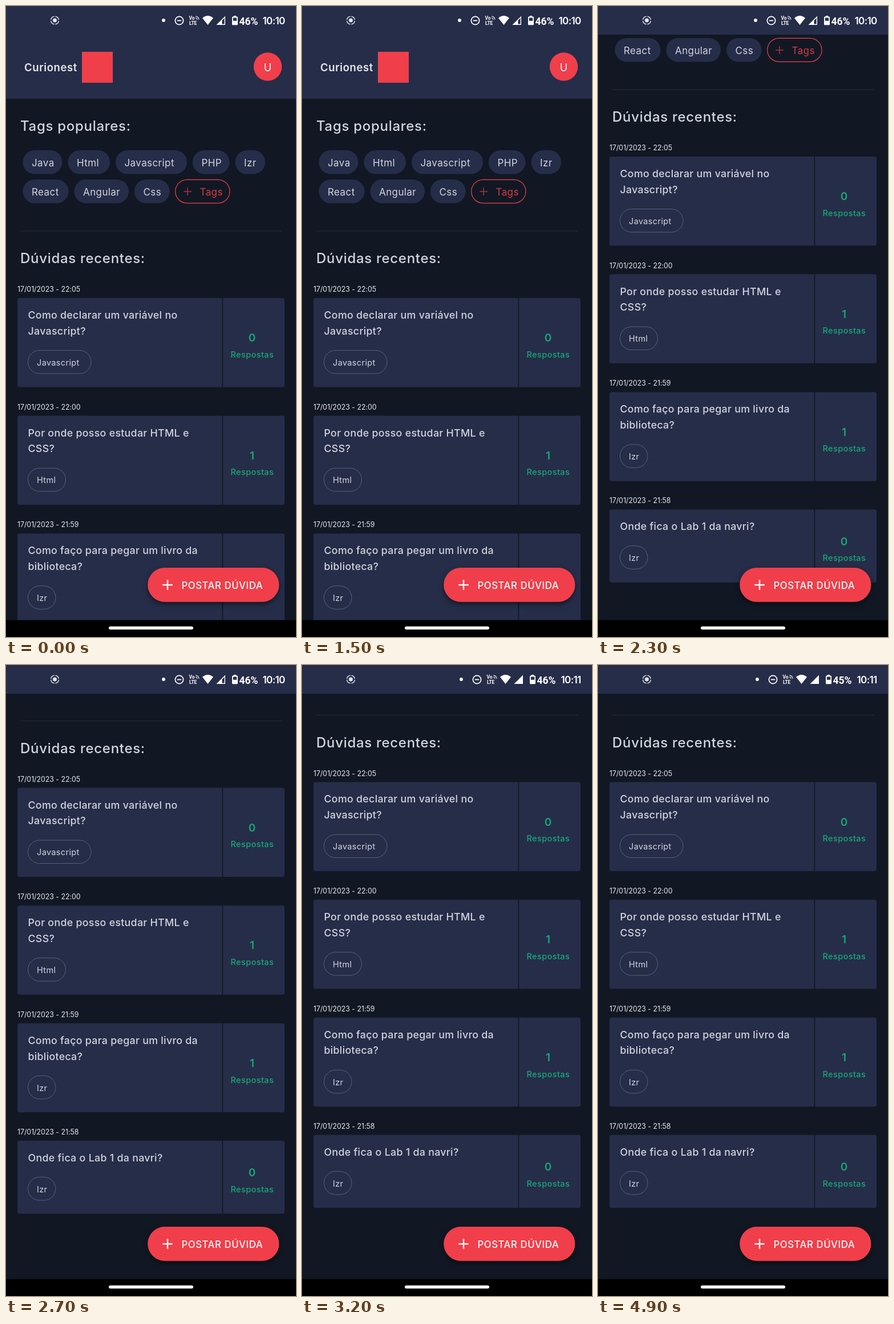
Recreate the animation shown at these times as an HTML page with a canvas. Size 508x1102 px, loop 5000 ms.

```html
<!DOCTYPE html>
<html lang="pt">
<head>
<meta charset="utf-8">
<style>
  html, body { margin: 0; width: 100%; height: 100%; overflow: hidden; background: #111824; }
  canvas { display: block; width: 508px; height: 1102px; }
</style>
</head>
<body>
<canvas id="stage"></canvas>
<script>
const W = 508, H = 1102, LOOP = 5000, STEP = 100;
const BG = '#111824', PANEL = '#262d49', RED = '#f03f4a', GREEN = '#17a877', PALE = '#d2d5de', WHITE = '#fff';

const canvas = document.getElementById('stage');
const ctx = canvas.getContext('2d');
const ratio = window.devicePixelRatio || 1;
canvas.width = W * ratio;
canvas.height = H * ratio;

// size, weight, letter spacing, family
const styles = {
  heading: [24, 500, 0.7],
  brand: [18.5, 600, 0.6],
  tag: [17, 400, 0.4],
  title: [17.8, 500, 0.3],
  date: [12.4, 400, -0.05],
  small: [14.5, 400, 0.35],
  reply: [14.5, 500, 0.4],
  count: [19, 600, 0],
  button: [16.8, 500, 0.55],
  avatar: [18, 400, 0],
  clock: [17, 600, -0.65],
  percent: [17.5, 600, 0, 'Roboto'],
  tiny: [8.5, 700, -0.2, 'Roboto']
};

// Tag label, left edge, top edge, width
const tags = [
  ['Java', 29.5, 252, 69], ['Html', 108.5, 252, 73.5], ['Javascript', 192, 252, 125],
  ['PHP', 327, 252, 64.5], ['Izr', 401.5, 252, 52.5],
  ['React', 29.5, 303, 80], ['Angular', 119.5, 303, 95.5], ['Css', 225, 303, 61.5]
];

const cards = [
  { y: 510, date: '22:05', lines: ['Como declarar um variável no', 'Javascript?'], tag: 'Javascript', tagW: 110.5, replies: 0 },
  { y: 715.6, date: '22:00', lines: ['Por onde posso estudar HTML e', 'CSS?'], tag: 'Html', tagW: 66, replies: 1, pressed: true },
  { y: 921.3, date: '21:59', lines: ['Como faço para pegar um livro da', 'biblioteca?'], tag: 'Izr', tagW: 48.5, replies: 1 },
  { y: 1126.3, date: '21:58', lines: ['Onde fica o Lab 1 da navri?'], tag: 'Izr', tagW: 48.5, replies: 0 }
];

// y is the middle of the capitals
function text(str, x, y, style, color, align = 'left') {
  const [size, weight, spacing, family = 'Inter'] = styles[style];
  ctx.font = `${weight} ${size}px ${family}, sans-serif`;
  ctx.letterSpacing = spacing + 'px';
  ctx.textAlign = align;
  ctx.fillStyle = color;
  ctx.fillText(str, x, y + size * 0.364);
}

function rect(x, y, w, h, color) {
  ctx.fillStyle = color;
  ctx.fillRect(x, y, w, h);
}

function round(x, y, w, h, r, fill, stroke, line = 1) {
  ctx.beginPath();
  ctx.roundRect(x, y, w, h, r);
  paint(fill, stroke, line);
}

function disc(x, y, r, fill, stroke, line) {
  ctx.beginPath();
  ctx.arc(x, y, r, 0, Math.PI * 2);
  paint(fill, stroke, line);
}

function paint(fill, stroke, line) {
  if (fill) {
    ctx.fillStyle = fill;
    ctx.fill();
  }
  if (stroke) {
    ctx.strokeStyle = stroke;
    ctx.lineWidth = line;
    ctx.stroke();
  }
}

function plus(x, y, size, line, color) {
  rect(x - size / 2, y - line / 2, size, line, color);
  rect(x - line / 2, y - size / 2, line, size, color);
}

function polygon(points, fill) {
  ctx.beginPath();
  points.forEach(([x, y]) => ctx.lineTo(x, y));
  ctx.closePath();
  paint(fill);
}

function mix(t, keys) {
  for (let i = 1; i < keys.length; i++) {
    const [t0, v0] = keys[i - 1], [t1, v1] = keys[i];
    if (t <= t1) return v0 + (v1 - v0) * Math.max(0, (t - t0) / (t1 - t0));
  }
  return keys[keys.length - 1][1];
}

function scrollAt(t) {
  if (t < 2300) return mix(t, [[2000, 0], [2100, 30], [2200, 165], [2300, 247]]);
  const left = Math.max(0, 1 - (t - 2300) / 900);
  return 305.5 - 58.5 * left ** 3;
}

const pressAlpha = t => mix(t, [[1900, 1], [2000, 0.85], [2100, 0.48], [2200, 0.8], [2300, 1]]);

function drawHeader() {
  rect(0, 0, W, 162, PANEL);
  text('Curionest', 32, 107, 'brand', '#e8e9ee');
  rect(133, 80, 54, 54, RED);
  disc(458.5, 106, 24.7, RED);
  text('U', 458.5, 107, 'avatar', WHITE, 'center');
}

function drawTags() {
  text('Tags populares:', 25, 209.5, 'heading', PALE);
  for (const [label, x, y, w] of tags) {
    round(x, y, w, 41.5, 20.7, PANEL);
    text(label, x + 15.5, y + 22, 'tag', PALE);
  }
  round(296.6, 303.3, 95.4, 41, 20.5, null, RED, 1.2);
  plus(318, 324, 14, 1.5, '#a93040');
  text('Tags', 339.5, 325, 'tag', '#d63a47');
  rect(25, 392.5, 458, 1, '#262e3b');
}

// Each part of a pressed card is see-through on its own
function drawCard(card, t) {
  const { y, lines } = card;
  const extra = 28 * (lines.length - 1);
  const h = 127.5 + extra, mid = y + h / 2, chipY = y + 63.5 + extra;
  ctx.globalAlpha = card.pressed ? pressAlpha(t) : 1;
  text('17/01/2023 - ' + card.date, 20, y - 15.5, 'date', '#e6e8ec');
  round(20, y, 358.5, h, [4, 0, 0, 4], PANEL);
  round(380.3, y, 107.7, h, [0, 4, 4, 0], PANEL);
  lines.forEach((line, i) => text(line, 38.5, y + 29.5 + i * 27.7, 'title', PALE));
  round(38.5, chipY, card.tagW, 40.5, 20.2, PANEL, '#566079');
  text(card.tag, 54, chipY + 21, 'small', PALE);
  text(String(card.replies), 431, mid - 8.3, 'count', GREEN, 'center');
  text('Respostas', 431.3, mid + 20.7, 'reply', GREEN, 'center');
  ctx.globalAlpha = 1;
}

function drawButton() {
  ctx.save();
  ctx.shadowColor = 'rgba(0,0,0,0.5)';
  ctx.shadowBlur = 9 * ratio;
  ctx.shadowOffsetY = 4 * ratio;
  round(248.2, 981, 230.2, 59.8, 29.9, RED);
  ctx.restore();
  plus(283, 1011, 17.5, 2.4, WHITE);
  text('POSTAR DÚVIDA', 307.5, 1012, 'button', WHITE);
}

function drawRecorder() {
  disc(85.5, 25, 3.5, '#e4e6ee');
  for (let i = 0; i < 4; i++) {
    const a = Math.PI / 4 + i * Math.PI / 2;
    ctx.beginPath();
    ctx.arc(85.5, 25, 6.9, a - 0.66, a + 0.66);
    paint(null, '#d5d8e3', 1.5);
  }
}

function drawStatus(t) {
  const late = t >= 3000;
  rect(0, 0, W, 50, PANEL);
  drawRecorder();
  ctx.save();
  ctx.translate(late ? 3 : 0, 0);
  disc(276, 25, 2.9, WHITE);
  disc(303.5, 25.5, 7.1, null, WHITE, 1.7);
  rect(299.8, 24.6, 7.4, 1.8, WHITE);

  text('Vo', 320.5, 21, 'tiny', WHITE);
  text('LTE', 321, 30, 'tiny', WHITE);
  for (const r of [3, 6]) {
    ctx.beginPath();
    ctx.arc(332, 24, r, -Math.PI / 2, 0);
    paint(null, WHITE, 1.1);
  }

  ctx.beginPath();
  ctx.moveTo(344, 21);
  ctx.quadraticCurveTo(353.5, 13, 363, 21);
  ctx.lineTo(353.5, 33);
  ctx.closePath();
  paint(WHITE);

  polygon([[384, 17.5], [384, 33], [368.5, 33]], WHITE);
  if (!late) polygon([[382.6, 21], [382.6, 31.6], [378.5, 31.6], [378.5, 25.2]], PANEL);

  rect(398.8, 17, 4.4, 2.5, WHITE);
  round(396, 18.6, 10, 14.6, 1.5, WHITE);
  rect(397.8, 20.6, 6.4, 5.2, PANEL);
  text((t >= 4000 ? 45 : 46) + '%', 408.5, 26.3, 'percent', WHITE);
  ctx.restore();
  text(late ? '10:11' : '10:10', 488.5, 26.3, 'clock', WHITE, 'right');
}

function draw(t) {
  ctx.setTransform(ratio, 0, 0, ratio, 0, 0);
  rect(0, 0, W, H, BG);

  ctx.save();
  ctx.translate(0, -scrollAt(t));
  drawHeader();
  drawTags();
  text('Dúvidas recentes:', 25, 440.5, 'heading', PALE);
  cards.forEach(card => drawCard(card, t));
  ctx.restore();

  drawButton();
  drawStatus(t);
  rect(0, 1072.5, W, 30, '#000');
  round(180, 1083.5, 148, 5.5, 2.75, '#f4f4f4');
}

const start = performance.now();
function frame() {
  const t = (performance.now() - start) % LOOP;
  draw(Math.floor(t / STEP) * STEP);
  requestAnimationFrame(frame);
}
frame();
</script>
</body>
</html>
```
